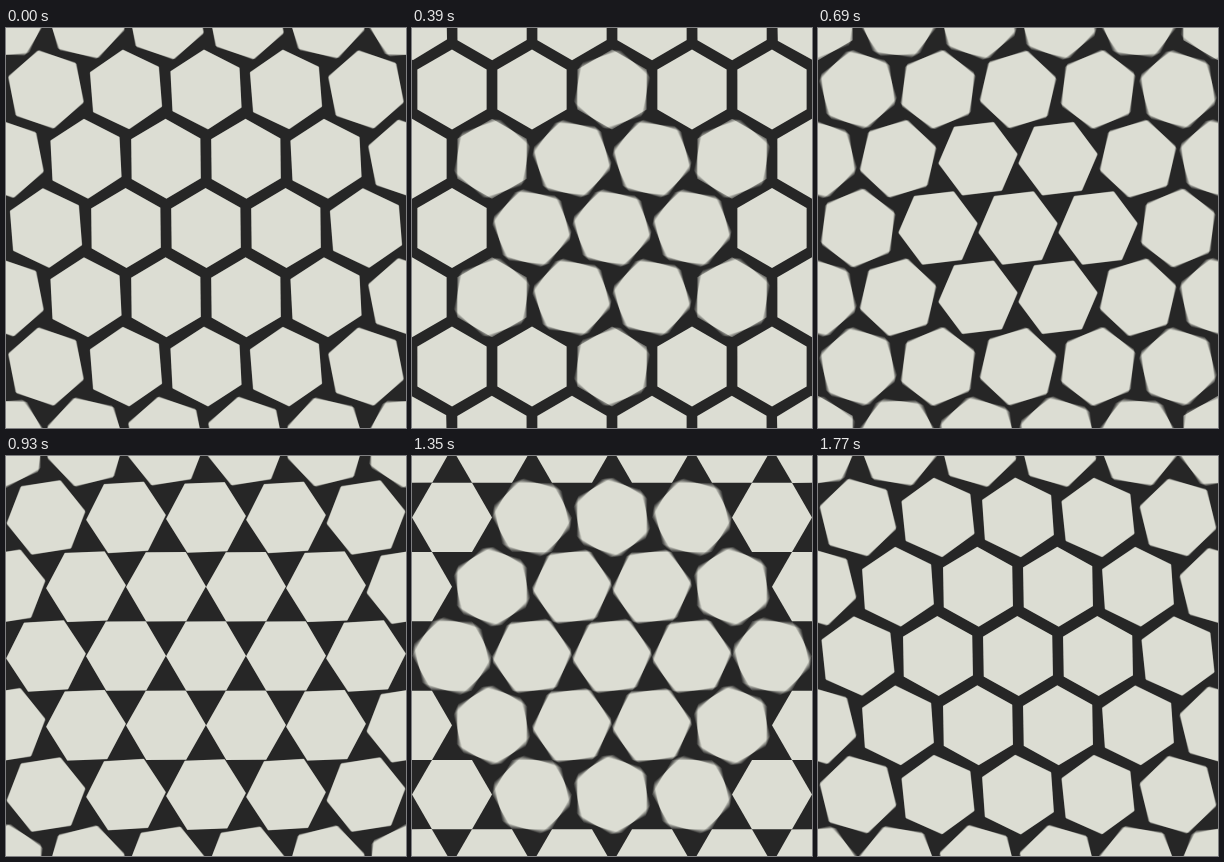
Recreate the animation shown at these times as an HTML page with a canvas. Size 400 by 400 pixels, loop 1.8 s.

```html
<!DOCTYPE html>
<html lang="en">
<head>
<meta charset="utf-8">
<title>Turning hexagons</title>
<style>
html, body { margin: 0; width: 100%; height: 100%; overflow: hidden; background: #262626; }
canvas { display: block; width: 400px; height: 400px; }
</style>
</head>
<body>
<canvas id="stage" width="400" height="400"></canvas>
<script>
const SIZE = 400, LOOP = 1800, TURN = 900, STEP = 30;
const RADIUS = 40, ROW = RADIUS * Math.sqrt(3);
const SAMPLES = 16, SHUTTER = 60;

const stage = document.getElementById('stage').getContext('2d');
const layer = document.createElement('canvas');
layer.width = layer.height = SIZE;
const ctx = layer.getContext('2d');

const cells = [];
for (let row = -3; row <= 3; row++) {
  for (let col = -3; col <= 3; col++) {
    const x = (col + (row & 1) / 2) * 2 * RADIUS;
    const y = row * ROW;
    // the wave spreads outward from the first ring
    const start = 96 + 2.07 * Math.max(Math.hypot(x, y), 2 * RADIUS);
    cells.push({ x: SIZE / 2 + x, y: SIZE / 2 + y, start });
  }
}

const easeOut = p => 1 - Math.pow(1 - p, 4);

// a quarter turn per period, beginning with a corner on top
function angleAt(time) {
  const turns = Math.floor(time / TURN);
  return (turns + easeOut(time / TURN - turns)) * Math.PI / 2 - Math.PI / 6;
}

function hexagon(x, y, angle) {
  for (let i = 0; i < 6; i++) {
    const a = angle + i * Math.PI / 3;
    ctx.lineTo(x + RADIUS * Math.cos(a), y + RADIUS * Math.sin(a));
  }
  ctx.closePath();
}

function paint(time) {
  ctx.fillStyle = '#262626';
  ctx.fillRect(0, 0, SIZE, SIZE);
  ctx.fillStyle = '#dcddd3';
  for (const c of cells) {
    ctx.beginPath();
    hexagon(c.x, c.y, angleAt(time - c.start));
    ctx.fill();
  }
}

// average several whole pictures for motion blur
function render(time) {
  for (let i = 0; i < SAMPLES; i++) {
    paint(time + ((i + 0.5) / SAMPLES - 0.5) * SHUTTER);
    stage.globalAlpha = 1 / (i + 1);
    stage.drawImage(layer, 0, 0);
  }
}

const origin = performance.now();
let last = -1;
function frame() {
  const time = Math.floor((performance.now() - origin) % LOOP / STEP) * STEP;
  if (time !== last) render(last = time);
  requestAnimationFrame(frame);
}
frame();
</script>
</body>
</html>
```
